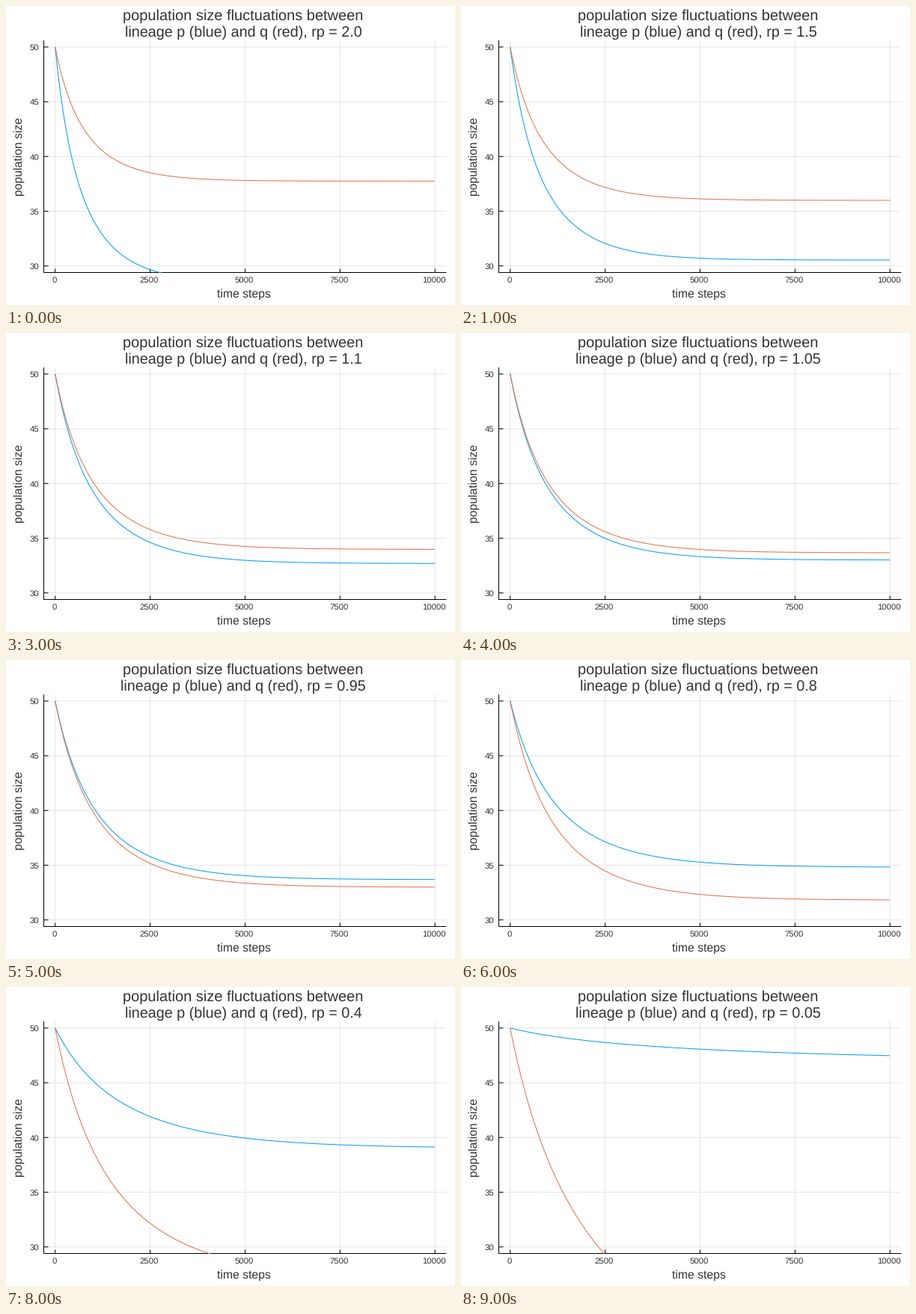
A matplotlib script that plays this animation: 600x400 px, repeating every 10000 ms.

```python
import numpy as np
import matplotlib.pyplot as plt
from matplotlib.animation import FuncAnimation
from matplotlib.patches import Rectangle

plt.rcParams["font.family"] = "Liberation Sans"
plt.rcParams["text.hinting"] = "none"

W, H, DPI = 600, 400, 100
LEFT, RIGHT, TOP, BOTTOM = 50.5, 588.5, 46.1, 356.5
X_MIN, X_MAX, Y_MIN, Y_MAX = -300, 10300, 29.4, 50.6
BLUE, RED, INK = "#009afa", "#e26f46", "#333333"

RATES = np.array([2.0, 1.5, 1.3, 1.1, 1.05, 0.95, 0.8, 0.6, 0.4, 0.05])
STEPS = 10000
START = 50.0
SPEED = 0.0007


def px(t):
    return LEFT + (t - X_MIN) / (X_MAX - X_MIN) * (RIGHT - LEFT)


def py(n):
    return BOTTOM - (n - Y_MIN) / (Y_MAX - Y_MIN) * (BOTTOM - TOP)


def simulate():
    """Both lineages shrink towards a shared limit, p at rp times the pace of q."""
    p = np.full((STEPS + 1, len(RATES)), START)
    q = p.copy()
    for i in range(STEPS):
        a, b = p[i], q[i]
        growth = SPEED * (1 - (a * a + a * b + b * b) / (START * (a + b)))
        p[i + 1] = a + RATES * a * growth
        q[i + 1] = b + b * growth
    return p, q


fig = plt.figure(figsize=(W / DPI, H / DPI), dpi=DPI, facecolor="white")
ax = fig.add_axes([0, 0, 1, 1])
ax.set_xlim(0, W)
ax.set_ylim(H, 0)
ax.axis("off")


def segment(xs, ys, alpha=1.0, z=2):
    ax.plot(xs, ys, color="black", lw=72 / DPI, alpha=alpha, zorder=z,
            solid_capstyle="butt", snap=False)


def label(x, y, text, size, **kw):
    kw = {"ha": "center", "va": "baseline", "color": INK, **kw}
    return ax.text(x, y, text, fontsize=size * 72 / DPI, **kw)


for t in range(0, 10001, 2500):
    x = px(t)
    segment([x, x], [TOP, BOTTOM], alpha=0.1, z=1)
    segment([x, x], [BOTTOM, BOTTOM - 5])
    label(x - 1.5, 370, str(t), 11.4)

for n in range(30, 51, 5):
    y = py(n)
    segment([LEFT, RIGHT], [y, y], alpha=0.1, z=1)
    segment([LEFT, LEFT + 6], [y, y])
    label(44, y + 4.1, str(n), 11.4, ha="right")

segment([LEFT, LEFT], [TOP, BOTTOM + 0.5])
segment([LEFT - 0.5, RIGHT], [BOTTOM, BOTTOM])

label(318, 389.5, "time steps", 15.7)
label(25.5, 201, "population size", 15.7, rotation=90, ha="right", va="center")
label(317, 19, "population size fluctuations between", 20)
title = label(317, 41, "", 19.8)

p_all, q_all = simulate()
every = slice(None, None, 10)
times = px(np.arange(STEPS + 1)[every])
area = Rectangle((LEFT, TOP), RIGHT - LEFT, BOTTOM - TOP, transform=ax.transData)


def curve(color):
    line, = ax.plot([], [], color=color, lw=72 / DPI, zorder=3,
                    solid_capstyle="butt")
    line.set_clip_path(area)
    return line


p_line, q_line = curve(BLUE), curve(RED)


def draw(i):
    p_line.set_data(times, py(p_all[every, i]))
    q_line.set_data(times, py(q_all[every, i]))
    title.set_text(f"lineage p (blue) and q (red), rp = {RATES[i]}")
    return p_line, q_line, title


anim = FuncAnimation(fig, draw, frames=len(RATES), interval=1000, repeat=True,
                     repeat_delay=0, blit=False)
plt.show()
```
